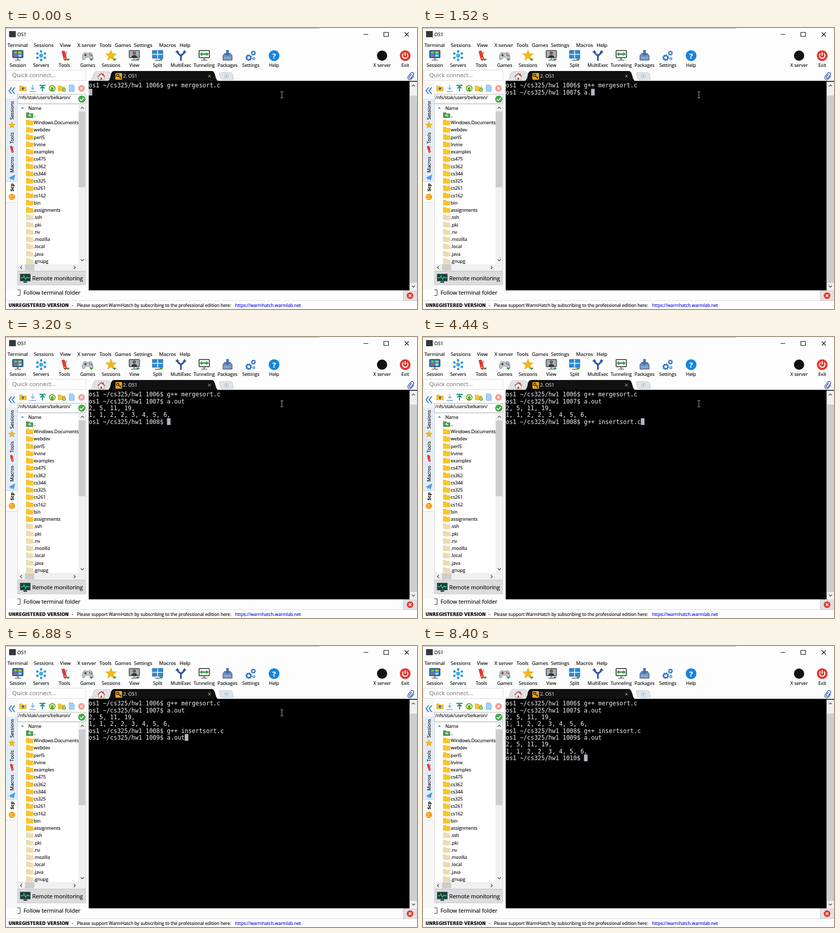
An HTML page for the animation above (8800 ms loop, 800 by 549 pixels).

```html
<!DOCTYPE html>
<html lang="en">
<head>
<meta charset="utf-8">
<title>Terminal session</title>
<style>
  html, body { margin: 0; width: 100%; height: 100%; overflow: hidden; background: #fdfdfd; }
  svg { display: block; width: 800px; height: 549px; }
  text { font-family: "Open Sans", "Noto Sans", sans-serif; white-space: pre; }
  .term text { font: 11.5px "DejaVu Sans Mono", monospace; fill: #f0f0f0; }
</style>
</head>
<body>
<svg id="stage" viewBox="0 0 800 549" xmlns="http://www.w3.org/2000/svg"></svg>
<script>
const LOOP = 8800, POINTER_HIDES = 7920;
const CELL = 6.923, ROW = 40 / 3, LEFT = 161, TOP = 105.5, BASELINE = 10.75;
const BLUE = '#2673c8', NAVY = '#31539f', GOLD = '#f5b914', RED = '#e5392e', GREEN = '#2f9e3c', INK = '#000';

// Drawing helpers, each returning SVG markup
const rect = (x, y, w, h, fill, extra = '') =>
  `<rect x="${x}" y="${y}" width="${w}" height="${h}" fill="${fill}" ${extra}/>`;
const circle = (x, y, r, fill, extra = '') => `<circle cx="${x}" cy="${y}" r="${r}" fill="${fill}" ${extra}/>`;
const shape = (d, fill, extra = '') => `<path d="${d}" fill="${fill}" ${extra}/>`;
const line = (d, color, width = 1, extra = '') =>
  `<path d="${d}" fill="none" stroke="${color}" stroke-width="${width}" ${extra}/>`;
const text = (x, y, size, str, fill = INK, extra = '') =>
  `<text x="${x}" y="${y}" font-size="${size}" fill="${fill}" stroke="${fill}" stroke-width=".15" ${extra}>${str}</text>`;
const at = (x, y, body, more = '') => `<g transform="translate(${x} ${y}) ${more}">${body}</g>`;
const centred = 'text-anchor="middle"';
const bordered = color => `stroke="${color}"`;

const around = (count, draw) => Array.from({ length: count }, (_, i) => draw(i * 2 * Math.PI / count - Math.PI / 2, i));

function star(r) {
  const points = around(10, (a, i) => {
    const d = i % 2 ? r * 0.43 : r;
    return `${(d * Math.cos(a)).toFixed(2)},${(d * Math.sin(a)).toFixed(2)}`;
  });
  return `<polygon points="${points.join(' ')}" fill="${GOLD}" stroke="#dc9c08" stroke-width=".7"/>`;
}
function hub() {
  return circle(0, 0, 3.4, '#19a5dc') + around(6, a => {
    const x = 8.5 * Math.cos(a), y = 8.5 * Math.sin(a);
    return line(`M0 0L${x} ${y}`, '#4cb5e0') + circle(x, y, 2.3, '#1c8fd0');
  }).join('');
}
const gear = (x, y, r) =>
  circle(x, y, r, 'none', `stroke="${BLUE}" stroke-width="${r * 0.65}"`) +
  circle(x, y, r * 1.4, 'none',
    `stroke="${BLUE}" stroke-width="${r * 0.45}" pathLength="16" stroke-dasharray="1 1"`);
const monitor = (fill, frame = '#3d4a58') =>
  rect(-10, -10, 20, 14, fill, `stroke="${frame}" stroke-width="1.5" rx="1"`) +
  rect(-2, 5, 4, 3, '#9aa5af') + rect(-6, 8, 12, 1.6, '#6c7781');
const knife =
  line('M-5 -9L-2 0M5 -8L1 1', '#9ba4ac', 2) +
  rect(-3.2, -10, 6.4, 20, RED, 'rx="3.2" transform="rotate(-14)"') + circle(1, 5, 1.1, '#fff');
const caret = shape('M3 6h8l-4 4.5z', GREEN);
const folder = (fill, edge) =>
  shape('M-6.5 -5h5l1.5 2h6.5v8h-13z', fill, `stroke="${edge}" stroke-width=".6"`);

const icons = {
  Session: monitor('#2d7fc4', '#2c4663') + rect(-7, -8, 5, 4, '#67c947') + rect(1, -8, 6, 4, GOLD) +
    rect(-7, -2, 5, 4, '#e75445') + rect(1, -2, 6, 4, '#a8d4f4'),
  Servers: hub(),
  Tools: knife + caret,
  Games: shape('M-6 -6Q0 -3 6 -6C9 -6 12 6 9 8C6 9 4 3 3 3H-3C-4 3 -6 9 -9 8C-12 6 -9 -6 -6 -6Z',
    '#c3c8ce', bordered('#747c85')) + line('M-7 -1h5M-4.5 -3.5v5', '#30363d', 1.5) +
    circle(4, -2, 1.4, RED) + circle(7, 0, 1.4, BLUE) + caret,
  Sessions: star(11) + caret,
  View: monitor('#a3aeb8') + circle(0, -5, 3.2, '#8c542d') + shape('M-6 4Q-5 -1 0 -1Q5 -1 6 4Z', '#303236') + caret,
  Split: rect(-10, -10, 20, 15, '#278ad8', bordered('#1d5794')) +
    line('M0 -10V5M-10 -2.5H10', '#fff', 1.5) + line('M-5 9h10', '#6c7781', 1.8) + caret,
  MultiExec: line('M0 10V2Q0 -1 -4 -3Q-7 -5 -7 -8M0 2Q0 -1 4 -3Q7 -5 7 -8', NAVY, 3.2) +
    shape('M-11 -6L-7 -11L-3 -6ZM3 -6L7 -11L11 -6Z', NAVY),
  Tunneling: monitor('#fbfdfb', '#222') + shape('M-9 -3l5 -4v2.5h8v-2.5l5 4l-5 4v-2.5h-8v2.5z', GREEN),
  Packages: shape('M-9 0L-6 -4H6L9 0V9H-9Z', '#6d8bb4', bordered('#46648f')) +
    rect(-7, 2, 14, 5, '#88a4c9') + shape('M-2.5 -11h5v6h4L0 1L-6.5 -5h4z', '#3e72b9'),
  Settings: gear(-4, 4, 4) + gear(5, -5, 3) + gear(6, 6, 1.8),
  Help: circle(0, 0, 10.5, '#1585e0') +
    text(0, 5.5, 15, '?', '#fff', `${centred} font-weight="bold"`),
  'X server': circle(0, 0, 10, '#111'),
  Exit: circle(0, 0, 10.5, RED) + line('M-3.5 -4A5.2 5.2 0 1 0 3.5 -4M0 -6.5V0', '#fff', 2)
};

function windowBar() {
  const menu = { Terminal: 3, Sessions: 54, View: 105, 'X server': 139, Tools: 182, Games: 212,
    Settings: 249, Macros: 298, Help: 338 };
  const slot = (name, i) => name === 'Exit' ? 777 : name === 'X server' ? 732 : 23 + i * 45.35;
  return rect(0, 0, 610, 1, '#aaa') + rect(6, 6, 13, 12, '#34383c') +
    text(22, 16.3, 9.2, 'OS1') +
    line('M696 12.5h9M735.5 8.5h9v8h-9zM776 8.5l8 8m0 -8l-8 8', '#111', 1.1) +
    Object.entries(menu).map(([name, x]) => text(x, 37, 9.7, name)).join('') +
    Object.entries(icons).map(([name, art], i) =>
      at(slot(name, i), 54, art) + text(slot(name, i), 76.3, 9, name, INK, centred)).join('');
}

function tabStrip() {
  return rect(1.5, 82.5, 154, 20, '#fff', bordered('#dcdcdc')) +
    text(12, 95.5, 11.5, 'Quick connect...', '#808080') +
    shape('M161 104Q168 103 170 91Q171 85 177 85H199Q204 85 209 104Z', '#e1e1e3', bordered('#c8c8ca')) +
    shape('M180 95L185.5 90L191 95V101H180Z', '#f7f3ee', 'stroke="#777" stroke-width=".7"') +
    rect(188, 89, 2, 4, '#8b4a3b') +
    line('M178.5 95l7 -6l7 6', '#cf3328', 1.6) + rect(184, 97, 3, 4, '#a54b2b') +
    shape('M197 104.5Q202 103 204 92Q205 84 211 84H400C410 84 405 104 416 104.5Z', '#111') +
    rect(213, 88, 13, 13, '#e9a31b', 'rx="1.5"') +
    circle(217.5, 92.5, 2.3, 'none', 'stroke="#352711" stroke-width="1.5"') +
    line('M219 94l5 5m-2 -2l2 -2', '#352711', 1.5) +
    text(228, 97.3, 9.2, '2. OS1', '#e7e7e7') +
    line('M393.5 91.5l5 5m0 -5l-5 5', '#b9b9b9') +
    shape('M415 88Q416 87 419 87H437Q440 87 441 91L443 101H421Q418 101 417 97Z', '#dfe5ec', bordered('#c3cbd5')) +
    circle(429, 94, 3.8, '#fff', bordered('#a5b1bf')) + line('M426.5 94h5M429 91.5v5', '#8492a2') +
    at(788, 93, line('M-3 5V-4A3 3 0 0 1 3 -4V4A1.8 1.8 0 0 1 -.6 4V-3M-3 4A3.6 3.6 0 0 0 5 5V-3',
      '#3859b3', 1.4), 'rotate(38)');
}

function sideTabs() {
  const label = (y, str, extra = '') => at(15, y, text(0, 0, 9.1, str, INK, centred + extra), 'rotate(-90)');
  return rect(0, 105, 22, 407, '#f7f7f8') + rect(0, 138, 22, 162, '#e3edf9') +
    line('M0 201.5h22M0 248.5h22', '#d5dfec') +
    rect(0, 300, 23, 40, '#fff') + line('M0 300.5h22M0 340.5h22', '#d8d8d8') +
    line('M11 116l-5 6.5l5 6.5M17 116l-5 6.5l5 6.5', '#2474cc', 1.8) +
    label(161, 'Sessions') + at(11.5, 190, star(6.8)) +
    label(215, 'Tools') + at(11.5, 237, knife, 'scale(.7)') +
    label(267, 'Macros') + shape('M5 293L18 286L15 298L11 295L9 298V294Z', '#4a9de2') +
    label(311.5, 'Scp', ' font-weight="bold"') +
    circle(11.5, 330, 6.2, '#f59a16') + line('M6 328q5 2 11 -2M9 325q0 6 6 10M6 333q4 -2 9 1', '#ffd175');
}

function fileTools() {
  return at(33, 118, folder('#f8c32e', '#d39a0a') + line('M0 4V-1M-2.5 1L0 -1.5L2.5 1', '#285cad', 1.5)) +
    line('M52 111v9m-3.5 -3.5l3.5 3.5l3.5 -3.5M46 124h12', '#73a9dc', 1.5) +
    line('M71 124v-10m-4 4l4 -4l4 4M65 112h12', '#149080', 2) +
    circle(90, 118, 6.5, '#62ae22') + line('M87 120.5a3.7 3.7 0 1 1 5.5 0.5', '#fff', 1.6) +
    at(108, 118, folder('#f8c32e', '#d39a0a')) + circle(113, 121, 3.5, '#58ae35') +
    line('M111 121h4M113 119v4', '#fff') +
    shape('M123 111h7l3 3v10h-10z', '#a5d0f5', bordered('#80b8e9')) +
    circle(147, 118, 6.5, '#f39b8f') + line('M144.5 115.5l5 5m0 -5l-5 5', '#fff', 1.5) +
    rect(22.5, 129.5, 133, 18, '#fff', bordered('#b9b9b9')) +
    text(24, 138.5, 8.6, '/nfs/stak/users/belkaron/') +
    circle(147.5, 139, 7, '#45a849') + line('M143.5 139l3 3l5 -5.5', '#fff', 1.7);
}

function fileList() {
  const names = ('.. Windows.Documents webdev perl5 Irvine examples cs475 cs362 cs344 cs325 cs261 cs162 ' +
    'bin assignments .ssh .pki .nv .mozilla .local .java .gnupg').split(' ');
  const rows = names.map((name, i) => {
    const y = 170.3 + i * 14.25, hidden = i > 13;
    const icon = i === 0 ? folder('#4b9952', '#347a3b') + line('M2 3V0H-2m2 -2l-2 2l2 2', '#fff', 1.1)
      : hidden ? folder('#eddcae', '#dfcc99') : folder('#ffc425', '#e4a60c');
    return at(46, y, icon) + text(54, y + 3.6, 8.9, name);
  }).join('');
  return rect(22.5, 149.5, 133, 325, '#fff', bordered('#d9d9d9')) +
    shape('M29 157.5l3 -3l3 3z', '#2685c9') + text(43.5, 159.5, 9, 'Name') +
    `<clipPath id="list"><path d="M23 150H141V461H23Z"/></clipPath><g clip-path="url(#list)">${rows}</g>` +
    rect(141, 150, 14, 311, '#f0f0f0') + rect(141.5, 163, 13, 148, '#cdcdcd') +
    line('M145.5 157.5l3 -3l3 3M145.5 452l3 3l3 -3', '#444', 1.2) +
    rect(23, 461, 132, 13, '#f0f0f0') + rect(37, 461.5, 18, 12, '#cdcdcd') +
    line('M31 465l-3 3l3 3M132 465l3 3l-3 3', '#444', 1.2);
}

function footer() {
  return rect(22.5, 475.5, 132.5, 26.5, '#dcdcdc', bordered('#c8c8c8')) +
    rect(28, 481, 19, 13, '#123e3b', 'stroke="#394448" stroke-width="1.5"') +
    line('M29 488h4l2 -4l3 7l3 -5l1 2h4', '#42d494', 1.3) + rect(34, 495, 7, 3, '#4c565b') +
    text(51, 493.2, 10.9, 'Remote monitoring') +
    line('M22 511.5h5.5v11H22', '#333') + text(34, 521, 10.85, 'Follow terminal folder') +
    line('M0 532.5H800', '#dedede') +
    text(5, 544.6, 8.35, 'UNREGISTERED VERSION', INK,
      'font-weight="bold" style="font-family:\'DejaVu Sans\',sans-serif"') +
    text(128, 544.6, 8.6, '-') +
    text(138, 544.6, 8.62, 'Please support WarmHatch by subscribing to the professional edition here:') +
    text(446, 544.6, 8.65, 'https://warmhatch.warmlab.net', '#0000e0') +
    rect(773.5, 513.5, 27, 19, '#e1e1e1', bordered('#c9c9c9')) +
    circle(786.5, 523, 6.5, RED) + line('M784 520.5l5 5m0 -5l-5 5', '#fff', 1.6);
}

function terminal() {
  const rows = Array.from({ length: 9 }, (_, i) =>
    `<text x="${LEFT}" y="${TOP + BASELINE + i * ROW}"></text>`);
  return rect(785.5, 104, 14.5, 408, '#f0f0f0') + rect(786.5, 132, 13.5, 366, '#cdcdcd') +
    line('M790 114l3 -3l3 3M790 503.5l3 3l3 -3', '#444', 1.2) +
    rect(161, 103.5, 624.5, 409, INK) + rect(161, 103.5, 639, 1.5, INK) +
    `<g class="term">${rows.join('')}</g>` + rect(0, 0, 7, 13, '#b1b8c5', 'id="cursor"') +
    line('M534.5 124.5h2l.5 .5l.5 -.5h2M537 125v11M534.5 136.5h2l.5 -.5l.5 .5h2', '#b8b8b8', 1, 'id="pointer"');
}

const stage = document.getElementById('stage');
stage.innerHTML = rect(0, 0, 800, 549, '#fdfdfd') + windowBar() + tabStrip() + sideTabs() +
  fileTools() + fileList() + footer() + terminal();

const prompt = n => `os1 ~/cs325/hw1 ${n}$ `;
const result = '\n2, 5, 11, 19,\n1, 1, 2, 2, 3, 4, 5, 6,\n';
// Time in ms and the characters that then arrive
const output = [
  [0, prompt(1006) + 'g++ mergesort.c\n'], [280, prompt(1007)],
  [1040, 'a'], [1480, '.'], [1920, 'o'], [2080, 'u'], [2200, 't'],
  [2840, result + prompt(1008)],
  [3520, 'g++ i'], [3760, 'nsertsort.'], [4400, 'c'],
  [5080, '\n'], [5320, prompt(1009)],
  [5960, 'a'], [6160, '.'], [6640, 'o'], [6760, 'u'], [6880, 't'],
  [7280, result + prompt(1010)]
];
const rows = stage.querySelectorAll('.term text');
const cursor = document.getElementById('cursor');
const pointer = document.getElementById('pointer');

function render(time) {
  const lines = output.filter(([start]) => start <= time).map(([, chars]) => chars).join('').split('\n');
  rows.forEach((row, i) => {
    const content = lines[i] || '';
    if (row.textContent !== content) row.textContent = content;
  });
  cursor.setAttribute('x', LEFT + lines[lines.length - 1].length * CELL);
  cursor.setAttribute('y', TOP + (lines.length - 1) * ROW);
  pointer.setAttribute('visibility', time < POINTER_HIDES ? 'visible' : 'hidden');
}

const began = performance.now();
function tick() {
  render((performance.now() - began) % LOOP);
  requestAnimationFrame(tick);
}
tick();
</script>
</body>
</html>
```
